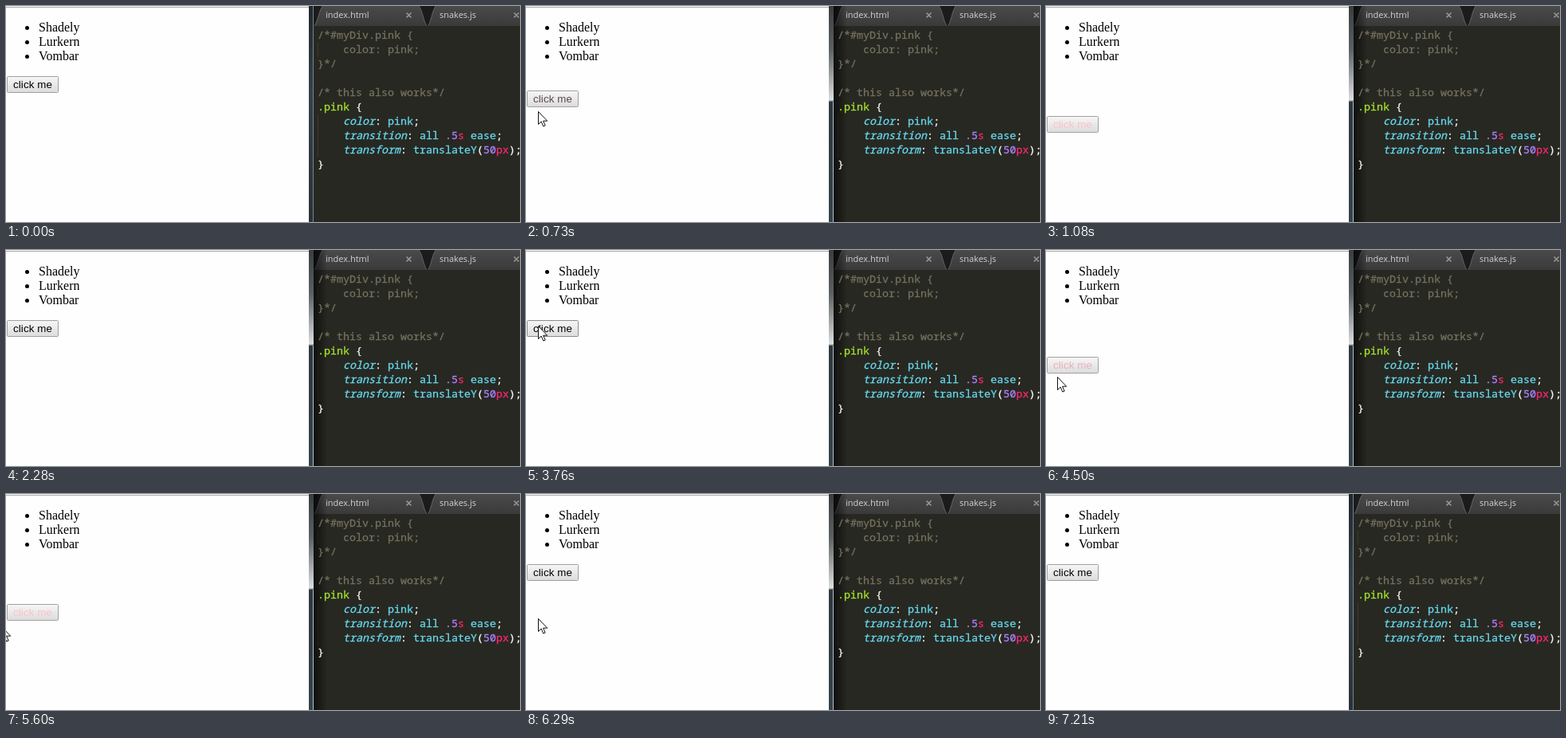
Animation, 645 px wide and 271 px high, one loop 7.24 s. Source, as an HTML page:

```html
<!DOCTYPE html>
<html lang="en">
<head>
<meta charset="utf-8">
<title>Button transition</title>
<style>
  html, body { margin: 0; width: 100%; height: 100%; overflow: hidden; background: #fefefe; }
  svg { display: block; width: 100%; height: 100%; }
  text { white-space: pre; }
  .list { font: 16px "Liberation Serif", "Times New Roman", serif; }
  .label { font: 13.33px "Liberation Sans", Arial, sans-serif; letter-spacing: .1px; }
  .tab { font: 11px "Open Sans", "Noto Sans", sans-serif; fill: #d0d0d0; }
  .code { font: 13.33px "Noto Sans Mono", "DejaVu Sans Mono", monospace; color: #f8f8f2; }
  .code tspan { fill: currentColor; stroke: currentColor; stroke-width: .3px; }
  .c { color: #75715e; }
  .g { color: #a6e22e; }
  .b { color: #66d9ef; }
  .i { color: #66d9ef; font-style: italic; }
  .n { color: #ae81ff; }
  .u { color: #f92672; }
</style>
</head>
<body>
<svg viewBox="0 0 645 271">
  <defs>
    <linearGradient id="face" x2="0" y2="1">
      <stop offset="0" stop-color="#f6f6f6"/><stop offset="1" stop-color="#dcdcdc"/>
    </linearGradient>
    <linearGradient id="faceDown" x2="0" y2="1">
      <stop offset="0" stop-color="#dedede"/><stop offset="1" stop-color="#eeeeee"/>
    </linearGradient>
    <linearGradient id="tabFill" x2="0" y2="1">
      <stop offset="0" stop-color="#4b4b4b"/><stop offset="1" stop-color="#393939"/>
    </linearGradient>
    <linearGradient id="idleBar" x2="0" y2="1">
      <stop offset="0" stop-color="#20282d"/><stop offset=".4" stop-color="#354149"/>
      <stop offset="1" stop-color="#293238"/>
    </linearGradient>
    <linearGradient id="glassBar" x2="0" y2="1">
      <stop offset="0" stop-color="#3a3d40"/><stop offset=".2" stop-color="#5c6062"/>
      <stop offset=".435" stop-color="#dcdedf"/><stop offset=".445" stop-color="#2e383e"/>
      <stop offset="1" stop-color="#35434b"/>
    </linearGradient>
    <linearGradient id="shade">
      <stop offset="0" stop-color="#000" stop-opacity=".6"/>
      <stop offset="1" stop-color="#000" stop-opacity="0"/>
    </linearGradient>
  </defs>

  <path d="M0 1.5H380" stroke="#a6a6a6"/>
  <g id="list" class="list"></g>

  <rect x="386" width="259" height="26" fill="#1b1b1b"/>
  <g fill="url(#tabFill)" stroke="#707070" stroke-width=".8">
    <path d="M528 27C534 22 534 4 541 -2H650V27Z"/>
    <path d="M385 27C392 22 392 4 399 -2H516C524 4 523 22 530 27Z"/>
  </g>
  <rect x="386" y="25" width="259" height="246" fill="#272822"/>
  <text class="tab" x="401" y="15">index.html</text>
  <text class="tab" x="544" y="15">snakes.js</text>
  <path d="M502.5 8.5l6 6m0-6l-6 6M637.5 8.5l6 6m0-6l-6 6" stroke="#969696" stroke-width="1.6"/>
  <path d="M391.5 46V64M391.5 136V190" stroke="#4a4b42" stroke-dasharray="1 1"/>

  <g id="idle">
    <rect x="380" width="6" height="271" fill="url(#idleBar)"/>
    <path d="M385.5 0V271" stroke="#77858c"/>
  </g>
  <g id="active">
    <rect x="380" width="6" height="271" fill="url(#glassBar)"/>
    <path d="M385.5 120V271" stroke="#b4c2ca"/>
    <rect x="386" width="17" height="271" fill="url(#shade)"/>
  </g>
  <g id="code" class="code"></g>

  <g id="button">
    <rect id="face-box" x="1.5" y=".5" width="64" height="20" rx="1"/>
    <text id="label" class="label" x="9" y="15">click me</text>
  </g>
  <path id="cursor" d="M.5 .5V16.5L4.2 13L6.8 19L9.2 18L6.6 12.2H11.7Z" fill="#fff" stroke="#111"/>
</svg>
<script>
const LOOP = 7240, FOCUS = 210, BLUR = 7210;
const EASE_MS = 500, PRESS_MS = 83;
const TOP = 88, DROP = 50;
const EDGE = -6;                    // pointer enters past the left edge
const AIM = { x: 15, y: TOP + 7 };  // spot it clicks on the resting button

const names = ["Shadely", "Lurkern", "Vombar"];

// Each token is class|text; an empty class is plain.
const code = [
  ["c|/*#myDiv.pink {"],
  ["c|    color: pink;"],
  ["c|}*/"],
  [],
  ["c|/* this also works*/"],
  ["g|.pink", "| {"],
  ["i|    color", "|: ", "b|pink", "|;"],
  ["i|    transition", "|: ", "b|all ", "n|.5", "u|s", "b| ease", "|;"],
  ["i|    transform", "|: ", "b|translateY", "|(", "n|50", "u|px", "|);"],
  ["|}"]
];

// Each visit clicks once and toggles the class: on, off, on, off.
const visits = [
  { enter: 330, arrive: 530, up: 615, gone: 1080, fromY: 130, to: { x: -14, y: 215 } },
  { enter: 1770, arrive: 1900, up: 2060, gone: 2280, fromY: 155, to: { x: -14, y: 152 } },
  { enter: 3130, arrive: 3760, up: 4173, gone: 4910, fromY: 101, to: { x: -14, y: 215 } },
  { enter: 5600, arrive: 5840, up: 6260, gone: 6750, fromY: 166, to: { x: 590, y: 275 } }
];

const $ = id => document.getElementById(id);
const mix = (a, b, f) => a + (b - a) * f;

$("list").innerHTML = names.map((name, i) => {
  const y = 32 + 18 * i;
  return `<circle cx="26.5" cy="${y - 4.5}" r="2.5"/><text x="41" y="${y}">${name}</text>`;
}).join("");

$("code").innerHTML = code.map((line, i) => {
  const spans = line.map(token => {
    const [kind, text] = token.split("|");
    return `<tspan class="${kind}">${text}</tspan>`;
  });
  return `<text x="391" y="${41 + 18 * i}">${spans.join("")}</text>`;
}).join("");

// CSS "ease": cubic-bezier(.25, .1, .25, 1)
function ease(x) {
  if (x >= 1) return 1;
  const curve = (s, a, b) => 3 * a * s * (1 - s) ** 2 + 3 * b * s * s * (1 - s) + s ** 3;
  let lo = 0, hi = 1;
  for (let i = 0; i < 20; i++) {
    const mid = (lo + hi) / 2;
    if (curve(mid, .25, .25) < x) lo = mid; else hi = mid;
  }
  return curve(lo, .1, 1);
}

// The rule lives on .pink, so only adding the class is animated.
function pinkness(t) {
  const count = visits.filter(v => t >= v.up).length;
  return count % 2 ? ease((t - visits[count - 1].up) / EASE_MS) : 0;
}

// Speeds up towards the button, rests, then drops away and curls off sideways.
function pointer(t) {
  const i = visits.findIndex(v => t >= v.enter && t < v.gone);
  if (i < 0) return null;
  const v = visits[i];
  const y = AIM.y + (i % 2) * DROP;
  if (t < v.up) {
    const f = Math.min(1, (t - v.enter) / (v.arrive - v.enter)) ** 3;
    return { x: Math.round(mix(EDGE, AIM.x, f)), y: Math.round(mix(v.fromY, y, f)) };
  }
  const f = (t - v.up) / (v.gone - v.up);
  return {
    x: Math.round(mix(AIM.x, v.to.x, f ** 4)),
    y: Math.round(mix(y, v.to.y, 1 - (1 - f) ** 1.3))
  };
}

function render(t) {
  const focused = t >= FOCUS && t < BLUR;
  $("active").style.display = focused ? "" : "none";
  $("idle").style.display = focused ? "none" : "";

  const pink = pinkness(t);
  const top = TOP + Math.round(DROP * pink);
  const p = pointer(t);
  const hover = p && p.x >= 1 && p.x < 66 && p.y >= top && p.y < top + 21;
  const pressed = visits.some(v => t >= v.up - PRESS_MS && t < v.up);

  $("button").setAttribute("transform", `translate(0 ${top})`);
  $("face-box").setAttribute("fill", pressed ? "url(#faceDown)" : "url(#face)");
  $("face-box").setAttribute("stroke", hover ? "#8c8c8c" : "#a0a0a0");
  const tint = [255, 192, 203].map(c => Math.round(c * pink));
  $("label").setAttribute("fill", `rgb(${tint})`);

  $("cursor").style.display = p ? "" : "none";
  if (p) $("cursor").setAttribute("transform", `translate(${p.x} ${p.y})`);
}

const start = performance.now();
function tick() {
  render((performance.now() - start) % LOOP);
  requestAnimationFrame(tick);
}
tick();
</script>
</body>
</html>
```
